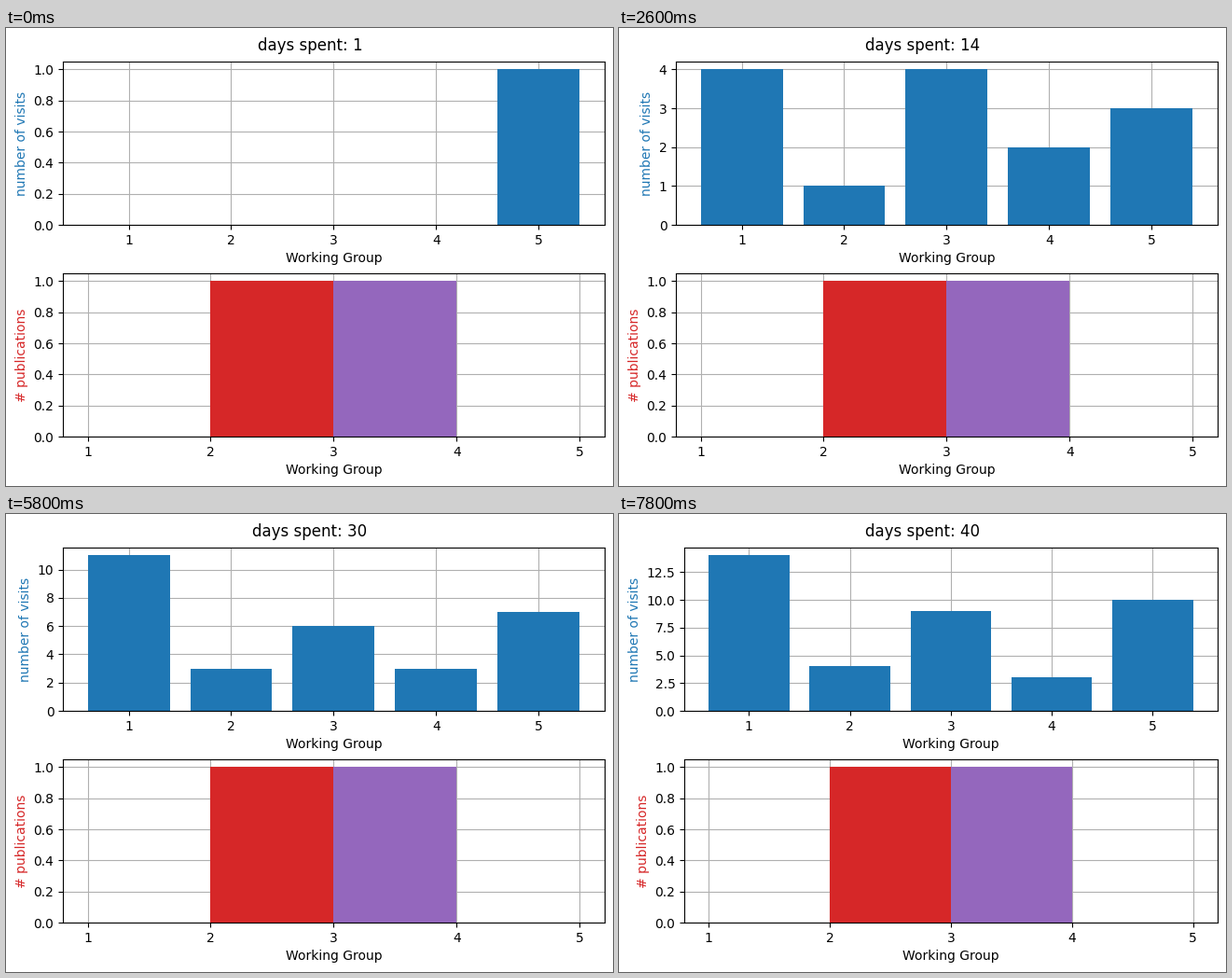
Recreate the animation shown at these times as a matplotlib script. Size 651 by 491 pixels, loop 8000 ms.

```python
import matplotlib.pyplot as plt
import numpy as np
from matplotlib.animation import FuncAnimation

W, H, DPI = 651, 491, 100
RIGHT = 641.6
AX_HEIGHT = 175
GROUPS = np.arange(1, 6)

# group visited on each day
VISITS = [int(c) for c in "5112131" "3453453" "115311125" "1534152" "3233" "515151"]

fig = plt.figure(figsize=(W / DPI, H / DPI), dpi=DPI, facecolor="white")
title = fig.text(325.83 / W, 1 - 10 / H, "", ha="center", va="top", fontsize=12)


def place(ax, left, base):
    """Position an axes from its left edge and its baseline in pixels."""
    ax.set_position([left / W, 1 - base / H, (RIGHT - left) / W, AX_HEIGHT / H])


def make_axes(ylabel, color, xlim):
    ax = fig.add_axes([0.1, 0.1, 0.8, 0.3], label=ylabel)
    ax.set_xlim(*xlim)
    ax.set_xticks(GROUPS)
    ax.set_xlabel("Working Group")
    ax.set_ylabel(ylabel, color=color)
    ax.set_axisbelow(True)
    ax.grid(True)
    return ax


visits_ax = make_axes("number of visits", "tab:blue", (0.36, 5.64))
pubs_ax = make_axes("# publications", "tab:red", (0.8, 5.2))

bars = visits_ax.bar(GROUPS, np.zeros(5), color="tab:blue")
pubs_ax.bar([2, 3], [1, 1], width=1, align="edge", color=["tab:red", "tab:purple"])
pubs_ax.set_xlim(0.8, 5.2)
pubs_ax.set_ylim(0, 1.05)
visits_ax.set_xlim(0.36, 5.64)


def update(i):
    day = i + 1
    counts = np.bincount(VISITS[:day], minlength=6)[1:]
    for bar, n in zip(bars, counts):
        bar.set_height(n)
    top = counts.max()
    visits_ax.set_ylim(0, top * 1.05)
    # labels such as 12.5 need a wider margin
    left = 70.1 if top >= 12 else 61.2
    place(visits_ax, left, 211.1)
    place(pubs_ax, left, 438.1)
    title.set_text(f"days spent: {day}")
    return [title, *bars]


anim = FuncAnimation(fig, update, frames=len(VISITS), interval=200,
                     repeat=True, repeat_delay=0, blit=False)
plt.show()
```
